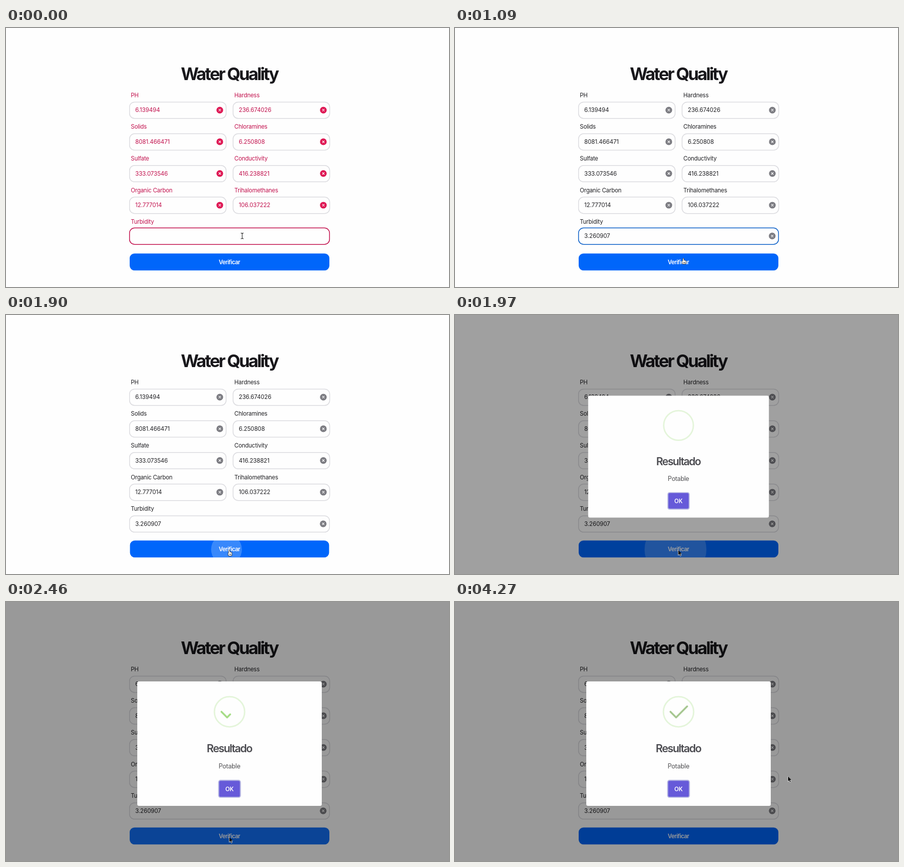
Recreate the animation shown at these times as an HTML page with a canvas. Size 874 by 512 pixels, loop 4.4 s.

```html
<!DOCTYPE html>
<html lang="en">
<head>
<meta charset="utf-8">
<title>Water Quality</title>
<style>
html, body { margin: 0; width: 100%; height: 100%; overflow: hidden; background: #fefefe; }
canvas { display: block; }
</style>
</head>
<body>
<canvas id="stage" width="874" height="512"></canvas>
<script>
const ctx = document.getElementById('stage').getContext('2d');
const LOOP = 4400, PASTE = 70, PRESS = 1680, BLUR = 1740, RIPPLE = 1830, POPUP = 1903;
const EM = 11.375;
const FONT = 'Inter, "Liberation Sans", sans-serif';
const RED = '#c2124e', INK = '#202024', GRAY = '#dcdce0', BLUE = '#0c60c8';

const FIELDS = {
  'PH': '6.139494', 'Hardness': '236.674026',
  'Solids': '8081.466471', 'Chloramines': '6.250808',
  'Sulfate': '333.073546', 'Conductivity': '416.238821',
  'Organic Carbon': '12.777014', 'Trihalomethanes': '106.037222'
};

const clamp = v => Math.min(1, Math.max(0, v));
const smooth = k => k * k * (3 - 2 * k);

// CSS "ease": cubic-bezier(.25, .1, .25, 1)
function ease(x) {
  let lo = 0, hi = 1;
  for (let i = 0; i < 20; i++) {
    const s = (lo + hi) / 2;
    if (0.75 * s * (1 - s) + s ** 3 < x) lo = s; else hi = s;
  }
  return 0.3 * lo * (1 - lo) ** 2 + 3 * lo * lo * (1 - lo) + lo ** 3;
}

// Progress from 0 to 1 between two moments
const ramp = (t, from, to, curve = ease) => curve(clamp((t - from) / (to - from)));

function mix(a, b, k) {
  const part = (c, i) => parseInt(c.slice(i, i + 2), 16);
  return `rgb(${[1, 3, 5].map(i => Math.round(part(a, i) * (1 - k) + part(b, i) * k))})`;
}

function text(str, x, y, size, color, { weight = 400, gap = 0, center = false } = {}) {
  ctx.font = `${weight} ${size}px ${FONT}`;
  ctx.letterSpacing = gap + 'px';
  ctx.textAlign = center ? 'center' : 'left';
  ctx.fillStyle = color;
  ctx.fillText(str, center ? x + gap / 2 : x, y);
}

function box(x, y, w, h, r, fill) {
  ctx.beginPath();
  ctx.roundRect(x, y, w, h, r);
  if (!fill) return;
  ctx.fillStyle = fill;
  ctx.fill();
}

function circle(x, y, r) {
  ctx.beginPath();
  ctx.arc(x, y, r, 0, 2 * Math.PI);
}

function at(x, y, scale, paint) {
  ctx.save();
  ctx.translate(x, y);
  ctx.scale(scale, scale);
  paint();
  ctx.restore();
}

function clearIcon(color) {
  ctx.fillStyle = color;
  circle(0, 0, 6.6);
  ctx.fill();
  ctx.strokeStyle = '#fff';
  ctx.lineWidth = 1.1;
  ctx.lineCap = 'round';
  ctx.beginPath();
  for (const side of [-1.9, 1.9]) {
    ctx.moveTo(-1.9, -side);
    ctx.lineTo(1.9, side);
  }
  ctx.stroke();
}

function field(x, y, w, label, value, labelY, ink, border, icon) {
  text(label, x + 3.3, labelY + 4.1, EM, ink, { gap: -0.2 });
  ctx.strokeStyle = border;
  ctx.lineWidth = 1.5;
  box(x + 0.7, y + 0.7, w - 1.4, 32.4, 10);
  ctx.stroke();
  if (!value) return;
  text(value, x + 12, y + 20.6, EM, ink, { gap: -0.08 });
  at(x + w - 13.2, y + 16.6, 1, () => clearIcon(icon));
}

function form(t) {
  const valid = ramp(t, PASTE, PASTE + 200), blur = ramp(t, BLUR, BLUR + 150);
  const ink = mix(RED, INK, valid), icon = mix('#de1854', '#7c7c82', valid);

  text('Water Quality', 442, 103, 34.13, '#18171b', { weight: 700, gap: -2.78, center: true });
  Object.entries(FIELDS).forEach(([label, value], i) => {
    const row = Math.floor(i / 2) * 62.65;
    field(243 + (i % 2) * 204.3, 145.7 + row, 192, label, value, 132.5 + row, ink, GRAY, icon);
  });
  const border = t < BLUR ? mix(RED, BLUE, valid) : mix(BLUE, GRAY, blur);
  field(243, 394.6 + 1.6 * blur, 396, 'Turbidity', t < PASTE ? '' : '3.260907', 383, ink, border, icon);
}

function button(t) {
  const press = ramp(t, PRESS, PRESS + 250) - ramp(t, PRESS + 110, PRESS + 290);
  at(441, 462.5, 1 - 0.03 * clamp(press), () => {
    box(-197, -16.8, 394, 33.6, 9.5, '#0066fa');
    const p = ramp(t, RIPPLE, RIPPLE + 904, k => k);
    ctx.save();
    ctx.clip();
    ctx.fillStyle = `rgba(255,255,255,${0.24 * (1 - p)})`;
    circle(-6, 1, 394 * p);
    ctx.fill();
    ctx.restore();
    text('Verificar', 0, 4.3, EM, '#fff', { weight: 600, gap: -0.55, center: true });
  });
}

// Ring with a tick that is drawn along its length
function tick(t) {
  const p = (t - POPUP) / 750, length = 4.2 * EM;
  const drawn = ramp(p, 0.56, 0.92, smooth);
  ctx.strokeStyle = 'rgba(165,220,134,.3)';
  ctx.lineWidth = 0.25 * EM;
  circle(0, 0, 2.625 * EM);
  ctx.stroke();
  if (!drawn) return;
  ctx.strokeStyle = t < 4200 ? '#a5dc86' : '#a6c791';
  ctx.lineWidth = 0.3125 * EM;
  ctx.lineCap = ctx.lineJoin = 'round';
  ctx.setLineDash([length * drawn, length]);
  ctx.beginPath();
  ctx.moveTo(-1.4 * EM, 0);
  ctx.lineTo(-0.42 * EM, 0.98 * EM);
  ctx.lineTo(1.5 * EM, -0.94 * EM);
  ctx.stroke();
  ctx.setLineDash([]);
}

function popup(t) {
  if (t < POPUP) return;
  ctx.fillStyle = `rgba(0,0,0,${0.4 * ramp(t, POPUP, POPUP + 100)})`;
  ctx.fillRect(0, 0, 874, 512);

  // Grows past full size, dips below it and settles
  const p = (t - POPUP) / 300;
  const scale = 0.7 + 0.35 * ramp(p, 0, 0.45) - 0.1 * ramp(p, 0.45, 0.8) + 0.05 * ramp(p, 0.8, 1);
  at(441, 280, scale, () => {
    box(-182, -123, 364, 246, 3.5, '#fefefe');
    at(0, -63, 1, () => tick(t));
    text('Resultado', 0.4, 17, 21.33, '#4b4b50', { weight: 600, gap: -1.56, center: true });
    text('Potable', 0, 49.4, 12.8, '#545457', { gap: -0.4, center: true });
    box(-22.4, 71.6, 44.8, 35.4, 4.5, '#b4b5e2');
    box(-20.4, 73.6, 40.8, 31.4, 2.8, '#665ad9');
    text('OK', 0, 93.6, EM, '#fff', { weight: 600, gap: -0.1, center: true });
  });
}

function outlined(fill, line) {
  ctx.lineJoin = 'round';
  ctx.lineWidth = 1.4;
  ctx.strokeStyle = line;
  ctx.stroke();
  ctx.fillStyle = fill;
  ctx.fill();
}

function arrow() {
  ctx.beginPath();
  ctx.lineTo(0, 0);
  ctx.lineTo(0, 9.6);
  ctx.lineTo(2.2, 7.6);
  ctx.lineTo(4.2, 11.2);
  ctx.lineTo(5.5, 10.4);
  ctx.lineTo(3.8, 7);
  ctx.lineTo(6.7, 6.8);
  outlined('#111', '#eee');
}

function hand() {
  ctx.beginPath();
  ctx.roundRect(-0.9, 0, 1.9, 8, 1);
  ctx.roundRect(-2, 4, 7, 7, 2);
  outlined('#fff', '#111');
  ctx.lineWidth = 0.7;
  ctx.beginPath();
  for (let x = 0.4; x < 4; x += 1.4) {
    ctx.moveTo(x, 7);
    ctx.lineTo(x, 9.4);
  }
  ctx.stroke();
}

function beam() {
  ctx.strokeStyle = '#222';
  ctx.lineWidth = 1.1;
  ctx.lineCap = 'butt';
  ctx.beginPath();
  for (const side of [-1, 1]) {
    ctx.moveTo(-2.6, 5.6 * side);
    ctx.quadraticCurveTo(0, 5.6 * side, 0, 4 * side);
    ctx.quadraticCurveTo(0, 5.6 * side, 2.6, 5.6 * side);
  }
  ctx.moveTo(0, -4);
  ctx.lineTo(0, 4);
  ctx.stroke();
}

// Drift in the field, go to the button, leave to the right, swing back
function pointer(t) {
  const drift = ramp(t, PASTE, 590, smooth), down = ramp(t, 660, 1280, smooth);
  const leave = ramp(t, 2560, 3080, smooth), out = ramp(t, 3120, 3270, smooth), back = ramp(t, 3270, 3460, smooth);
  const x = 466 + 19 * drift - 44.5 * down + 189 * leave + 55 * out - 27.5 * back;
  const y = 411 + 12 * drift + 42 * down - 187 * leave + 24 * out + 43 * back;
  const shape = t >= POPUP || (y > 428 && y < 446) ? arrow : y <= 428 ? beam : hand;
  at(x, y, 1, shape);
}

function draw(t) {
  ctx.fillStyle = '#fefefe';
  ctx.fillRect(0, 0, 874, 512);
  form(t);
  button(t);
  popup(t);
  pointer(t);
}

let start;
function frame(now) {
  start ??= now;
  draw((now - start) % LOOP);
  requestAnimationFrame(frame);
}
requestAnimationFrame(frame);
</script>
</body>
</html>
```
